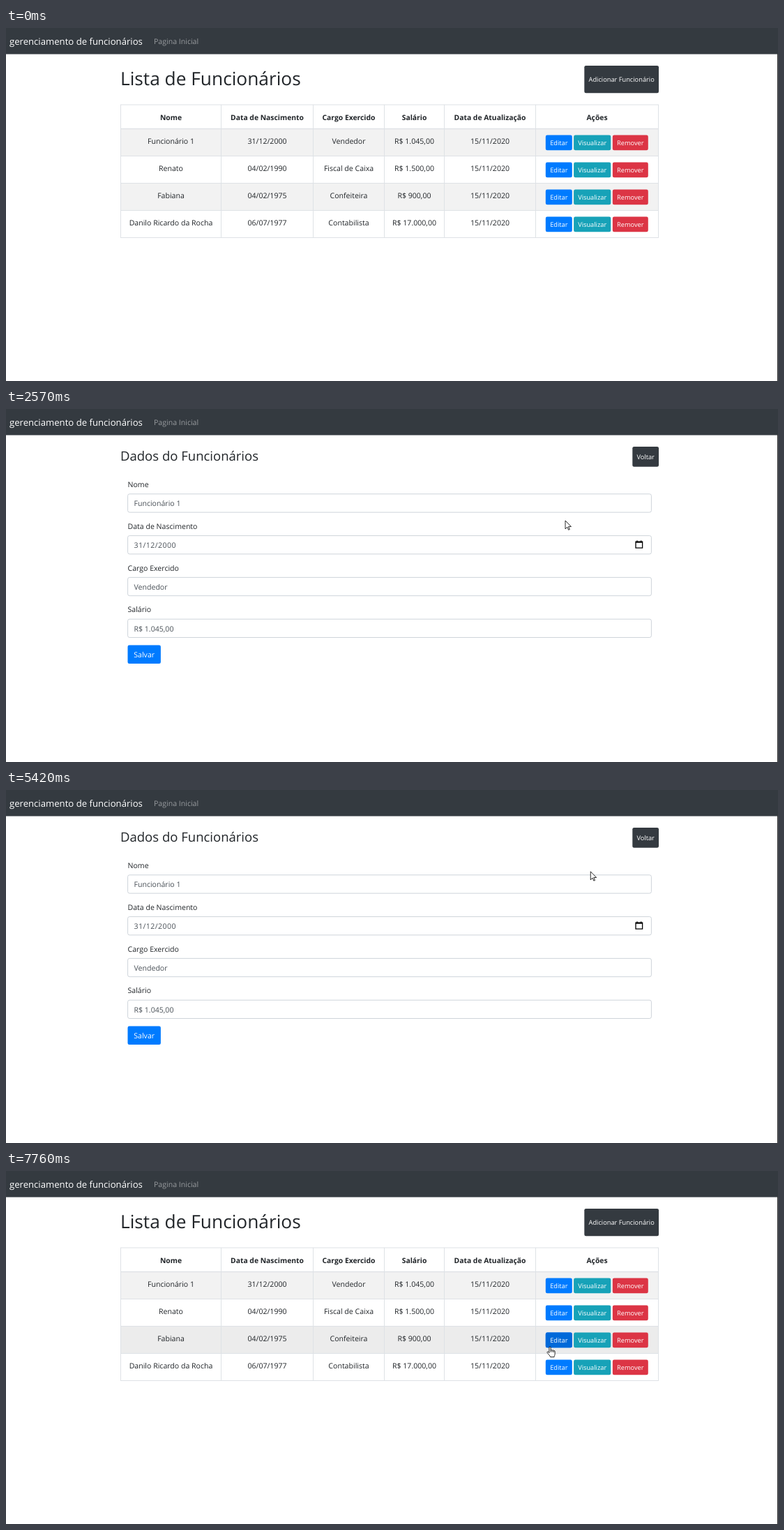
An HTML page for the animation above (8 s loop, 1107 by 506 pixels).

```html
<!DOCTYPE html>
<html lang="pt-BR">
<head>
<meta charset="utf-8">
<title>Gerenciamento de funcionários</title>
<style>
  html, body { margin: 0; width: 100%; height: 100%; overflow: hidden; background: #fff; }
  svg { display: block; }
  text { font-family: "Open Sans", "Noto Sans", sans-serif; text-rendering: geometricPrecision; }
</style>
</head>
<body>
<svg id="stage" width="1107" height="506" viewBox="0 0 1107 506"></svg>
<script>
const LOOP = 8000, FORM_OPENS = 2410, LIST_RETURNS = 6060, CURSOR_ENTERS = 460, FADE = 150;
const BODY = 10.57, SMALL = 9.25;
const INK = '#212529', DARK = '#343a40', LINE = '#dee2e6';
const HOVER = { '#007bff': '#0069d9', '#17a2b8': '#138496', '#dc3545': '#c82333', [DARK]: '#23272b' };

const stage = document.getElementById('stage');

function add(parent, tag, attrs = {}, content = '') {
  const node = document.createElementNS('http://www.w3.org/2000/svg', tag);
  for (const name in attrs) node.setAttribute(name, attrs[name]);
  node.textContent = content;
  return parent.appendChild(node);
}
const rect = (parent, x, y, width, height, fill, more) =>
  add(parent, 'rect', { x, y, width, height, fill, ...more });
const label = (parent, content, x, y, size = BODY, fill = INK, more) =>
  add(parent, 'text', { x, y, 'font-size': size, fill, ...more }, content);
const centered = (parent, content, x, y, size, fill, more) =>
  label(parent, content, x, y, size, fill, { 'text-anchor': 'middle', ...more });

const buttons = [];
function button(page, content, x, y, w, h, color, size = SMALL) {
  rect(page, x, y, w, h, color, { rx: 2.3 });
  const glow = rect(page, x, y, w, h, HOVER[color], { rx: 2.3, opacity: 0 });
  centered(page, content, x + w / 2, y + h / 2 + size * .365, size, '#fff');
  buttons.push({ page, x, y, w, h, glow });
}

// Shared frame
rect(stage, 0, 0, 1107, 37.5, DARK);
rect(stage, 1106, 37, 1, 469, '#2b2b2b');
label(stage, 'gerenciamento de funcionários', 5, 23.5, 13.15, '#fff');
label(stage, 'Pagina Inicial', 212, 22.5, BODY, '#999c9f');

// Employee list
const list = add(stage, 'g');
const edges = [164.5, 308.5, 440.5, 542.5, 628.5, 759.5, 935.5];
const middle = i => (edges[i] + edges[i + 1]) / 2;
const ROW_TOP = 144.5, ROW_H = 39;
const people = [
  ['Funcionário 1', '31/12/2000', 'Vendedor', 'R$ 1.045,00'],
  ['Renato', '04/02/1990', 'Fiscal de Caixa', 'R$ 1.500,00'],
  ['Fabiana', '04/02/1975', 'Confeiteira', 'R$ 900,00'],
  ['Danilo Ricardo da Rocha', '06/07/1977', 'Contabilista', 'R$ 17.000,00']
];
label(list, 'Lista de Funcionários', 164, 81.5, 26.3, INK, { 'font-weight': 500 });
button(list, 'Adicionar Funcionário', 829.3, 54, 106.7, 39.3, DARK);

const rows = people.map((_, i) => rect(list, 164.5, ROW_TOP + i * ROW_H, 771, ROW_H, '#fff'));
edges.forEach(x => rect(list, x - .5, 110, 1, 191, LINE));
[110, 183.5, 222.5, 261.5, 300.5].forEach(y => rect(list, 164, y - .5, 772, 1, LINE));
rect(list, 164, 143.8, 772, 1.4, LINE);
['Nome', 'Data de Nascimento', 'Cargo Exercido', 'Salário', 'Data de Atualização', 'Ações']
  .forEach((title, i) => centered(list, title, middle(i), 131.5, 10.35, INK, { 'font-weight': 700 }));
people.forEach((person, r) => {
  const y = r * ROW_H;
  [...person, '15/11/2020'].forEach((value, i) => centered(list, value, middle(i), 166.2 + y));
  button(list, 'Editar', 773.8, 153.6 + y, 38, 21.6, '#007bff');
  button(list, 'Visualizar', 814.1, 153.6 + y, 53.2, 21.6, '#17a2b8');
  button(list, 'Remover', 869.8, 153.6 + y, 51, 21.6, '#dc3545');
});

// Employee form
const form = add(stage, 'g');
const FIELD_TOP = 121.8, FIELD_STEP = 59.8, FIELD_H = 26.3;
label(form, 'Dados do Funcionários', 164, 73.8, 18.5, INK, { 'font-weight': 500 });
button(form, 'Voltar', 898.3, 54, 37.7, 28.8, DARK);
['Nome', 'Data de Nascimento', 'Cargo Exercido', 'Salário'].forEach((title, i) => {
  const y = FIELD_TOP + i * FIELD_STEP;
  label(form, title, 174.5, y - 9.8);
  rect(form, 174.6, y, 750.8, FIELD_H, '#fff', { rx: 2.6, stroke: '#ced4da' });
  label(form, people[0][i], 183.5, y + 17.6, BODY, '#495057', { 'letter-spacing': i === 1 ? .45 : 0 });
});
add(form, 'path', { d: 'M903 190.2h9.6v9h-9.6zM903 191.2h9.6M905 188.4v2M910.6 188.4v2',
  fill: 'none', stroke: '#000', 'stroke-width': 1.3 });
button(form, 'Salvar', 174.5, 338.4, 47.4, 26.6, '#007bff', BODY);

// Cursor shapes, each with its hot spot at the origin
const cursor = add(stage, 'g');
const shape = (d, more) => add(cursor, 'path',
  { d, fill: '#fff', stroke: '#000', 'stroke-width': 1.2, 'stroke-linejoin': 'round', ...more });
const shapes = {
  arrow: shape('M0 0V17L4 13.2 6.6 19 9 18 6.5 12.3H12z', { transform: 'scale(.7)' }),
  hand: shape('M5 13V2.2a1.6 1.6 0 0 1 3.2 0V8a1.6 1.6 0 0 1 3 .3a1.6 1.6 0 0 1 3 .6a1.5 1.5 0 0 1 2.6 1' +
    'V15c0 3-1.5 4-1.5 6.5H7.5C7 19 2 14.5 1 12.5c-.8-1.7 1.5-2.6 2.6-1.2zM8.2 8v3.5M11.2 8.5v3M14.2 9v3',
    { transform: 'scale(.7) translate(-6.6 -.6)' }),
  beam: shape('M-2-6h4M0-6V6M-2 6h4', { 'stroke-width': .8 })
};

// Time, x, y
const path = [
  [460, 1094, 492], [800, 905, 265], [1230, 802, 160], [2640, 802, 160], [2990, 200, 130],
  [3230, 300, 308], [3490, 780, 205], [3660, 669, 200], [4010, 240, 112], [4350, 240, 198],
  [4800, 300, 304], [5190, 426, 304], [5420, 838, 117], [5740, 915.5, 69.5], [6240, 915.5, 69.5],
  [6750, 797.5, 221], [6920, 784, 201], [7210, 783, 198.5], [7400, 783, 198.5], [7760, 780, 252]
];
function pointAt(t) {
  const next = path.findIndex(p => p[0] > t);
  if (next < 1) return path[next ? path.length - 1 : 0].slice(1);
  const [t0, x0, y0] = path[next - 1], [t1, x1, y1] = path[next];
  const k = (t - t0) / (t1 - t0);
  return [x0 + (x1 - x0) * k, y0 + (y1 - y0) * k];
}
const pageAt = t => t >= FORM_OPENS && t < LIST_RETURNS ? form : list;
function isOver(b, t) {
  const [x, y] = pointAt(t);
  return t >= CURSOR_ENTERS && b.page === pageAt(t) &&
    x >= b.x && x <= b.x + b.w && y >= b.y && y <= b.y + b.h;
}

function draw(t) {
  const page = pageAt(t), [x, y] = pointAt(t), visible = t >= CURSOR_ENTERS;
  list.style.display = page === list ? '' : 'none';
  form.style.display = page === form ? '' : 'none';

  const inTable = visible && x > edges[0] && x < edges[6];
  const hovered = inTable ? Math.floor((y - ROW_TOP) / ROW_H) : -1;
  rows.forEach((row, i) =>
    row.setAttribute('fill', i === hovered ? '#ececec' : i % 2 ? '#fff' : '#f2f2f2'));

  // Averaging recent hits gives each button its short hover fade
  const samples = 10;
  for (const b of buttons) {
    let hits = 0;
    for (let i = 0; i < samples; i++) hits += isOver(b, t - FADE * i / samples);
    b.glow.setAttribute('opacity', hits / samples);
  }

  const field = Math.floor((y - FIELD_TOP) / FIELD_STEP);
  const inText = page === form && x > 174 && x < 926 && [0, 2, 3].includes(field) &&
    y - FIELD_TOP - field * FIELD_STEP < FIELD_H;
  const kind = buttons.some(b => isOver(b, t)) ? 'hand' : inText ? 'beam' : 'arrow';
  for (const name in shapes) shapes[name].style.display = name === kind ? '' : 'none';
  cursor.style.display = visible ? '' : 'none';
  cursor.setAttribute('transform', `translate(${x} ${y})`);
}

const start = performance.now();
function tick() {
  draw((performance.now() - start) % LOOP);
  requestAnimationFrame(tick);
}
tick();
</script>
</body>
</html>
```
